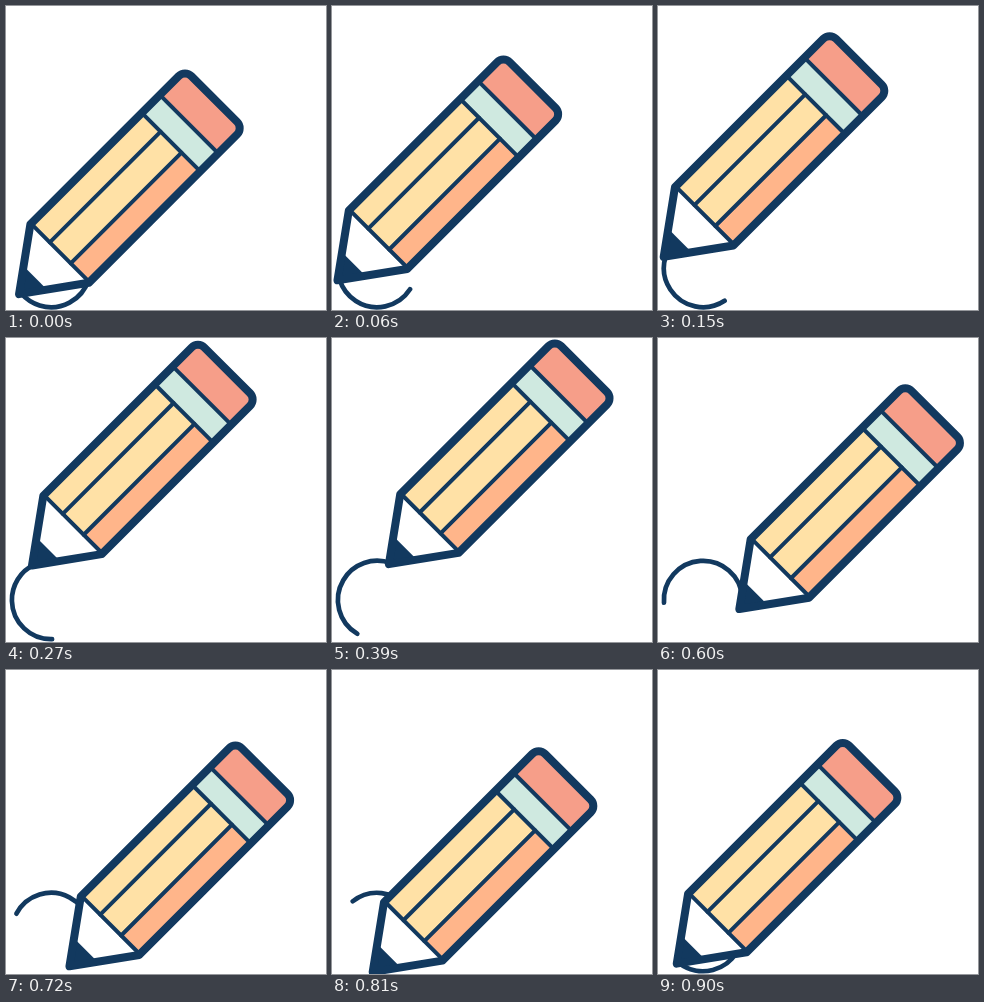
Recreate the animation shown at these times as an HTML page with a canvas. Size 320 by 304 pixels, loop 930 ms.

```html
<!DOCTYPE html>
<html lang="en">
<head>
<meta charset="utf-8">
<title>Pencil loop</title>
<style>
  html, body { margin: 0; width: 320px; height: 304px; overflow: hidden; background: #fff; }
  canvas { display: block; }
</style>
</head>
<body>
<canvas id="stage" width="320" height="304"></canvas>
<script>
const ctx = document.getElementById('stage').getContext('2d');
const STEP = 30, STEPS = 31;
const NAVY = '#12395f', CREAM = '#ffe1a6', ORANGE = '#ffb58a', MINT = '#cfe9e0', CORAL = '#f69e89';
const CENTER = { x: 45.1, y: 262 }, RADIUS = 39.2;

// Pencil frame: x runs from the tip to the eraser, y across the barrel.
const HALF = 41.3, SHOULDER = 56.3, BAND = 213, RUBBER = 238.4, END = 274, STRIPE = 14.8, CORNER = 9;

const rad = degrees => degrees * Math.PI / 180;

function outline() {
  ctx.beginPath();
  ctx.moveTo(-2, 0);
  ctx.lineTo(SHOULDER - 1, -HALF);
  ctx.arcTo(END, -HALF, END, HALF, CORNER);
  ctx.arcTo(END, HALF, SHOULDER, HALF, CORNER);
  ctx.lineTo(SHOULDER - 1, HALF);
  ctx.closePath();
}

function block(x0, x1, y0, y1, color) {
  ctx.fillStyle = color;
  ctx.fillRect(x0, y0, x1 - x0, y1 - y0);
}

function line(x0, y0, x1, y1) {
  ctx.beginPath();
  ctx.moveTo(x0, y0);
  ctx.lineTo(x1, y1);
  ctx.stroke();
}

function drawPencil(x, y) {
  ctx.save();
  ctx.translate(x, y);
  ctx.rotate(-Math.PI / 4);

  ctx.save();
  outline();
  ctx.clip();
  block(-5, SHOULDER, -HALF, HALF, '#fff');
  block(-5, 21, -HALF, HALF, NAVY);
  block(SHOULDER, BAND, -HALF, STRIPE, CREAM);
  block(SHOULDER, BAND, STRIPE, HALF, ORANGE);
  block(BAND, RUBBER, -HALF, HALF, MINT);
  block(RUBBER, END, -HALF, HALF, CORAL);
  ctx.lineWidth = 4;
  for (const across of [SHOULDER, BAND, RUBBER]) line(across, -HALF, across, HALF);
  for (const along of [-STRIPE, STRIPE]) line(SHOULDER, along, BAND, along);
  ctx.restore();

  outline();
  ctx.lineWidth = 8;
  ctx.stroke();
  ctx.restore();
}

function draw(step) {
  const head = rad(139.8 + step * 360 / STEPS);
  const tail = rad(17 + step * 7.95);
  ctx.fillStyle = '#fff';
  ctx.fillRect(0, 0, 320, 304);
  ctx.strokeStyle = NAVY;
  ctx.lineCap = ctx.lineJoin = 'round';

  ctx.lineWidth = 4.7;
  ctx.beginPath();
  ctx.arc(CENTER.x, CENTER.y, RADIUS, tail, head);
  ctx.stroke();

  drawPencil(CENTER.x - 0.7 + RADIUS * Math.cos(head), CENTER.y - 0.6 + RADIUS * Math.sin(head));
}

let start;
function tick(now) {
  start ??= now;
  draw(Math.floor((now - start) / STEP) % STEPS);
  requestAnimationFrame(tick);
}
draw(0);
requestAnimationFrame(tick);
</script>
</body>
</html>
```
